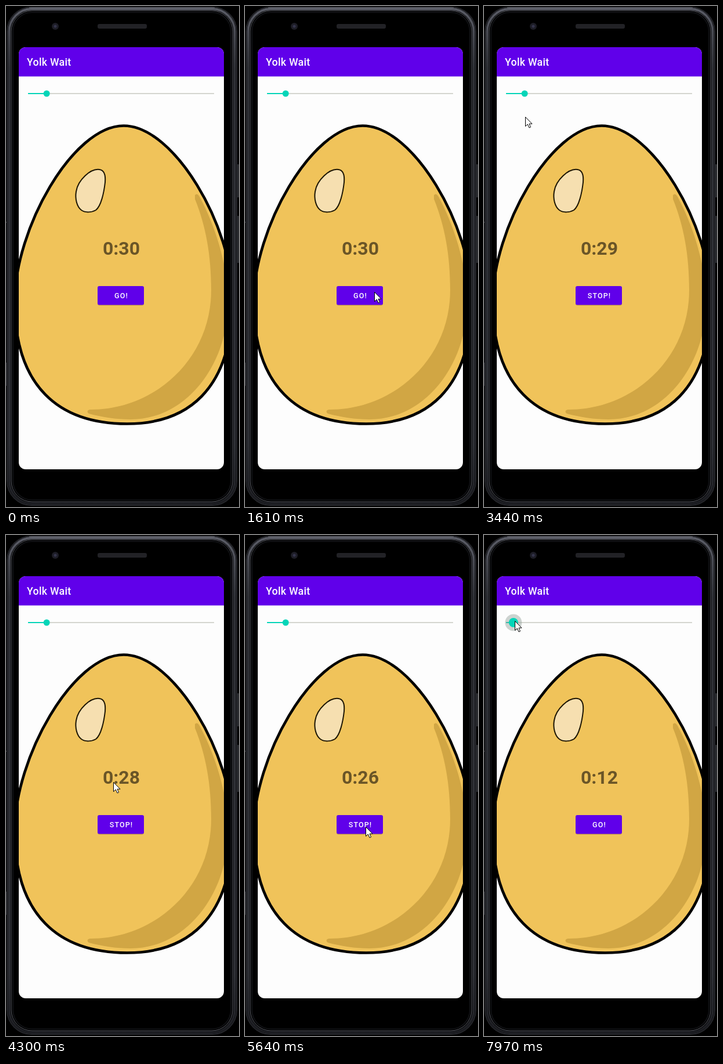
An HTML page that plays this animation: 402 px wide and 864 px high, repeating every 8 s.

```html
<!DOCTYPE html>
<html lang="en">
<head>
<meta charset="utf-8">
<title>Kitchen countdown</title>
<style>
  html, body { margin: 0; width: 100%; height: 100%; overflow: hidden; background: #000; }
  svg { display: block; width: 402px; height: 864px; }
  text { font-family: Roboto, sans-serif; font-weight: 500; }
  .time { font-size: 32px; font-weight: 700; fill: #6a5527; text-anchor: middle; }
  .label { font-size: 12.5px; letter-spacing: 1.1px; fill: #fff; text-anchor: middle; }
</style>
</head>
<body>
<svg viewBox="0 0 402 864">
  <defs>
    <clipPath id="screen"><rect x="22" y="71" width="354" height="728" rx="12"/></clipPath>
    <linearGradient id="metal" x1="0" y1="0" x2="0" y2="1">
      <stop offset="0" stop-color="#5a5c66"/>
      <stop offset=".12" stop-color="#303238"/>
      <stop offset=".88" stop-color="#303238"/>
      <stop offset="1" stop-color="#1c1d22"/>
    </linearGradient>
  </defs>

  <!-- Phone body -->
  <rect width="402" height="864"/>
  <g fill="none">
    <rect x="2" y="2" width="396" height="859" rx="42" stroke="#25262b" stroke-width="2"/>
    <rect x="5.5" y="5" width="389" height="853" rx="39" stroke="url(#metal)" stroke-width="4"/>
    <rect x="9" y="8" width="382" height="847" rx="36" stroke="#595b64"/>
    <rect x="12" y="11" width="376" height="841" rx="33" stroke="#101114" stroke-width="2"/>
    <path d="M40 3H360" stroke="#74767f"/>
    <path d="M400.5 273V330M400.5 362V443" stroke="#393b40" stroke-width="2"/>
    <path d="M.5 372V374M.5 615V655" stroke="#34363a"/>
  </g>
  <circle cx="85" cy="35" r="6" fill="#1d1d26"/>
  <circle cx="85" cy="35" r="2.5" fill="#33334a"/>
  <rect x="158" y="31" width="85" height="8" rx="3" fill="#222226"/>

  <g clip-path="url(#screen)">
    <rect x="22" y="71" width="354" height="728" fill="#fdfdfd"/>
    <rect x="22" y="71" width="354" height="50.5" fill="#6000ea"/>
    <text x="36" y="103" font-size="17.7" letter-spacing=".3" fill="#fff">Yolk Wait</text>

    <!-- Egg -->
    <path d="M203 206.5C290 206.5 391 380 391 505C391 665 310 720.5 209 720.5C90 720.5 15 655 15 510C15 385 115 206.5 203 206.5Z"
          fill="#f0c35a" stroke="#000" stroke-width="4.7"/>
    <path d="M326 326C330 322 333 326 336 333C356 370 383 440 383 510C383 620 310 713 215 713C190 713 165 709 143 703C139 700 140 697 145 696C255 697 354 610 354 490C354 430 345 380 326 333Z"
          fill="#d1a644"/>
    <path d="M161 282C170 283 172 292 171 304C169 322 164 345 155 352C148 356 137 357 130 352C122 346 119 332 121 320C124 300 146 280 161 282Z"
          fill="#f6dfb0" stroke="#1c1503" stroke-width="2"/>

    <!-- Slider -->
    <path d="M38 151H359" stroke="#d4d6cf" stroke-width="2"/>
    <path id="progress" stroke="#03d5b8" stroke-width="2"/>
    <circle id="halo" cy="151" r="14.5" fill="#85958c" fill-opacity=".4"/>
    <circle id="thumb" cy="151" fill="#03d5b8"/>

    <text id="time" class="time" x="199" y="428.5"></text>
    <rect x="158" y="484" width="80" height="32.5" rx="3" fill="#a88738" opacity=".6"/>
    <rect x="158" y="483" width="80" height="32.5" rx="3" fill="#6000ea"/>
    <text id="label" class="label" x="199" y="504"></text>
  </g>

  <path id="cursor" d="M0 0V16L3.8 12.5L6.5 18.5L9 17.4L6.5 11.7H11.5Z" fill="#fff" stroke="#000"/>
</svg>
<script>
  const LOOP = 8000, START = 1630, STOP = 5740, GRAB = 7000, ENTER = 390;

  // Cursor tip: time, x, y
  const path = [
    [ENTER, 402, 560], [1400, 223, 493], [1750, 223, 493],
    [2700, 71, 150], [3000, 71, 150], [3440, 71, 191],
    [4600, 208, 472], [5200, 208, 503], [5800, 208, 503],
    [6700, 72, 150], [GRAB, 72, 150], [7900, 53, 148], [LOOP, 53, 148]
  ];

  const ids = ['progress', 'halo', 'thumb', 'time', 'label', 'cursor'];
  const parts = Object.fromEntries(ids.map(id => [id, document.getElementById(id)]));
  const set = (el, attrs) => {
    for (const key in attrs) el.setAttribute(key, attrs[key]);
  };
  const ease = p => p * p * (3 - 2 * p);

  function cursorAt(t) {
    const i = path.findIndex(step => step[0] > t);
    if (i < 1) return [path[0][1], path[0][2]];
    const [t0, x0, y0] = path[i - 1], [t1, x1, y1] = path[i];
    const p = ease((t - t0) / (t1 - t0));
    return [x0 + (x1 - x0) * p, y0 + (y1 - y0) * p];
  }

  function draw(t) {
    const [x, y] = cursorAt(t);
    const running = t >= START && t < STOP;
    const held = t >= GRAB;
    const chosen = held ? Math.round(30 - 18 * (72 - x) / 19) : 30;
    const seconds = running ? 30 - Math.floor((t - START) / 1000) : chosen;
    const thumbX = 38 + 321 * chosen / 300;

    set(parts.progress, { d: `M38 151H${thumbX}` });
    set(parts.thumb, { cx: thumbX, r: held ? 8 : 5.5 });
    set(parts.halo, { cx: thumbX, visibility: held ? 'visible' : 'hidden' });
    set(parts.cursor, {
      transform: `translate(${Math.round(x) + .5} ${Math.round(y) + .5})`,
      visibility: t < ENTER ? 'hidden' : 'visible'
    });
    parts.time.textContent = '0:' + String(seconds).padStart(2, '0');
    parts.label.textContent = running ? 'STOP!' : 'GO!';
  }

  const began = performance.now();
  function frame() {
    draw((performance.now() - began) % LOOP);
    requestAnimationFrame(frame);
  }
  frame();
</script>
</body>
</html>
```
